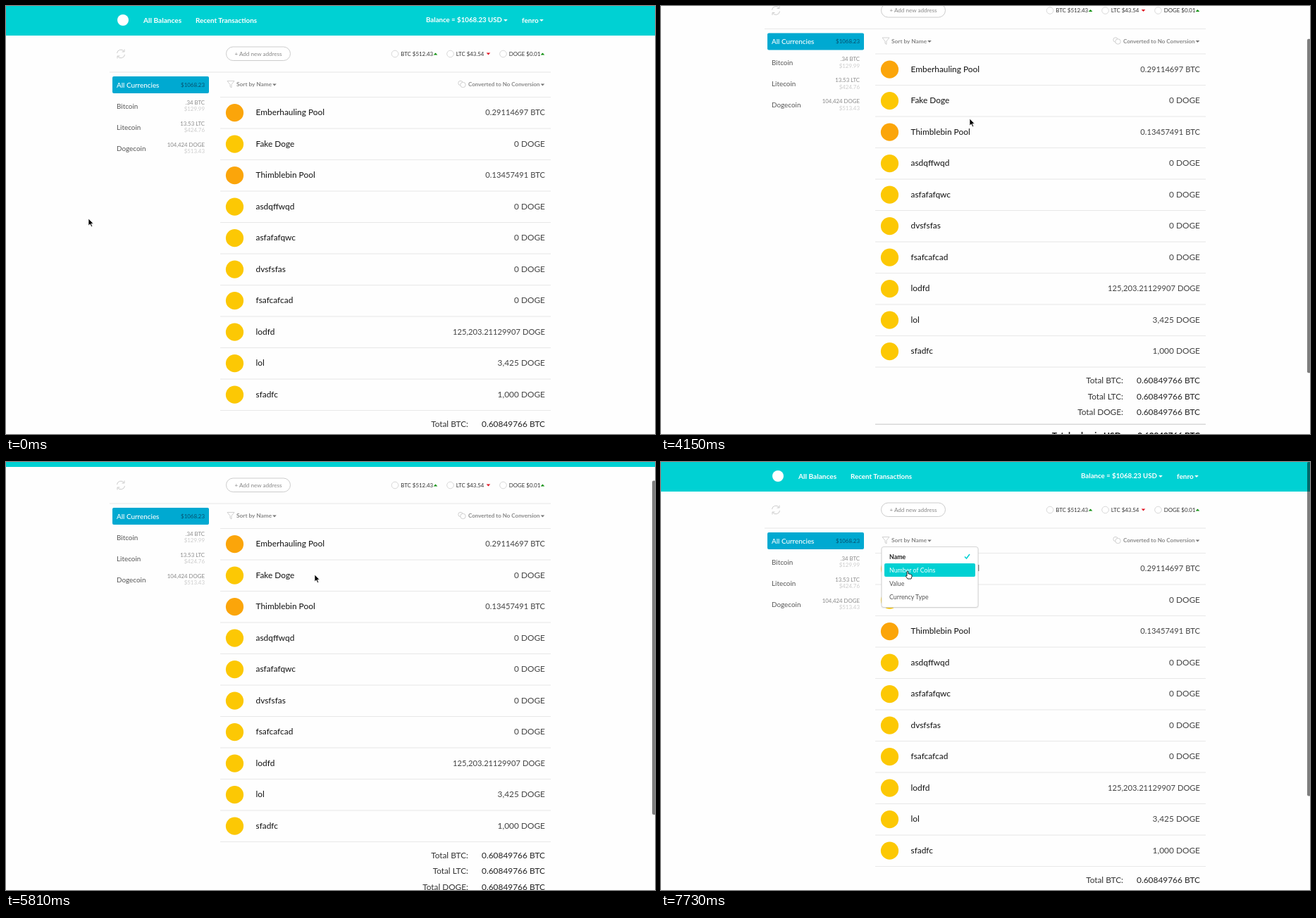
Recreate the animation shown at these times as an HTML page. Size 921 by 608 pixels, loop 8 s.

```html
<!DOCTYPE html>
<html lang="en">
<head>
<meta charset="utf-8">
<title>Balances</title>
<style>
html, body { margin: 0; width: 100%; height: 100%; overflow: hidden; background: #fefefe; }
svg { display: block; width: 921px; height: 608px; font-family: Lato, "Open Sans", sans-serif; }
</style>
</head>
<body>
<svg viewBox="0 0 921 608">
  <g id="page"></g>
  <rect id="thumb" x="917" width="5" height="475" rx="2" fill="#000" opacity=".5"/>
  <path id="arrow" d="M0 0V10L2.3 7.8L4 11.6L5.6 10.9L4 7.2H7Z" fill="#000" stroke="#fff" stroke-width=".7"/>
  <path id="hand" d="M-1 7V1Q0 -.6 1 1V4Q2 3.2 2.8 4.4Q4 3.8 4.5 5Q6 4.6 6 6V8L5 11H0L-2.6 7.4Q-2.6 5.8 -1 7Z" fill="#fff" stroke="#111" stroke-width=".9"/>
</svg>
<script>
const LOOP = 8000, TEAL = '#00d1d3';
const $ = id => document.getElementById(id);

// Text is placed by the middle of its capitals.
const text = (x, y, str, size, fill, weight = 400, anchor = 'start') =>
  `<text x="${x}" y="${y + size * .36}" font-size="${size}" fill="${fill}" font-weight="${weight}" text-anchor="${anchor}">${str}</text>`;
const right = (x, y, str, size, fill, weight) => text(x, y, str, size, fill, weight, 'end');
const rect = (x, y, w, h, fill, more = '') =>
  `<rect x="${x}" y="${y}" width="${w}" height="${h}" fill="${fill}" ${more}/>`;
const circle = (x, y, r, fill, stroke = 'none') =>
  `<circle cx="${x}" cy="${y}" r="${r}" fill="${fill}" stroke="${stroke}"/>`;
const caret = (x, y, fill, h = 3) =>
  `<path d="M${x - 2.8} ${y - h / 2}h5.6l-2.8 ${h}z" fill="${fill}"/>`;
const line = (d, stroke, width = 1) =>
  `<path d="${d}" fill="none" stroke="${stroke}" stroke-width="${width}"/>`;

function header() {
  return rect(0, -30, 921, 72, TEAL) + circle(166, 20, 8, '#fff') +
    text(195, 20, 'All Balances', 10.1, '#fff', 700) +
    text(269, 20, 'Recent Transactions', 9.8, '#fff', 700) +
    text(596, 20, 'Balance ≈ $1068.23 USD', 9.7, '#fff', 700) + caret(709, 20.5, '#fff') +
    text(732, 20, 'fenro', 10, '#fff', 700) + caret(760, 20.5, '#fff');
}

function toolbar() {
  const ticker = [[552, 'BTC $512.43', 609.5, 1], [630.5, 'LTC $43.54', 684.5, 0], [705.5, 'DOGE $0.01', 761.5, 1]];
  return line('M157.5 67a5.5 5.5 0 0 1 10-2.5m.5-3v3.5h-3.5M168.500 69a5.5 5.5 0 0 1-10 2.500m-.5 3v-3.500h3.500', '#ccc') +
    rect(312.5, 58, 91, 19.5, '#fff', 'rx="9.75" stroke="#ccc"') +
    text(358, 67.7, '+ Add new address', 8.1, '#888', 400, 'middle') +
    ticker.map(([x, s, cx, up]) => circle(x, 68, 4.8, '#fff', '#d8d8d8') +
      text(x + 8.2, 67.7, s, 7.9, '#333') +
      caret(cx, 68, up ? '#0a8f0a' : '#e01020', up ? -3 : 3)).join('') +
    rect(147, 93.5, 626, 1, '#e8e8e8') +
    line('M314 106.500h10l-4 5v4.500l-2-1.500v-3z', '#ccc', .9) +
    text(327, 111.5, 'Sort by Name', 8.3, '#888', 700) + caret(381, 112, '#777') +
    circle(645, 109.5, 3.2, '#fff', '#d0d0d0') + circle(648.5, 112, 3.7, '#fff', '#d0d0d0') +
    text(656, 111.5, 'Converted to No Conversion', 8, '#888', 700) + caret(761.5, 112, '#777');
}

function sidebar() {
  const coins = [['Bitcoin', '.34 BTC', '$129.99'], ['Litecoin', '13.53 LTC', '$424.76'], ['Dogecoin', '104,424 DOGE', '$513.43']];
  return rect(151, 100, 137, 24, '#00a9d1', 'rx="2"') +
    text(157, 112, 'All Currencies', 9.9, '#fff', 500) + right(282, 112, '$1068.23', 7.9, '#06506e') +
    coins.map(([name, amount, value], i) => text(157, 142 + i * 30, name, 9.9, '#555') +
      right(282, 137 + i * 30, amount, 7.8, '#888') + right(282, 146.5 + i * 30, value, 7.9, '#ccc')).join('');
}

function table() {
  const rows = [['Emberhauling Pool', '0.29114697 BTC'], ['Fake Doge', '0 DOGE'], ['Thimblebin Pool', '0.13457491 BTC'],
    ['asdqffwqd', '0 DOGE'], ['asfafafqwc', '0 DOGE'], ['dvsfsfas', '0 DOGE'], ['fsafcafcad', '0 DOGE'],
    ['lodfd', '125,203.21129907 DOGE'], ['lol', '3,425 DOGE'], ['sfadfc', '1,000 DOGE']];
  const totals = ['BTC', 'LTC', 'DOGE'], sum = '0.60849766 BTC';
  return rows.map(([name, value], i) => {
    const y = 151 + i * 44.5;
    return rect(304, y - 22, 469, 1, '#e8e8e8') +
      circle(324.5, y + .7, 12.6, value.endsWith('BTC') ? '#fba50a' : '#fcc804') +
      text(354.5, y, name, 11.9, '#111') + right(765, y, value, value.length > 12 ? 11.2 : 11.9, '#444');
  }).join('') + rect(304, 574, 469, 1, '#e8e8e8') +
    totals.map((c, i) => right(656, 593.5 + i * 22.5, `Total ${c}:`, 11.8, '#333') +
      right(765, 593.5 + i * 22.5, sum, 11.9, '#222')).join('') +
    rect(304, 655, 469, 1.5, '#d8d8d8') +
    right(656, 671.5, 'Total value in USD:', 12.1, '#111', 700) + right(765, 671.5, sum, 11.7, '#111', 700);
}

function menu(hover) {
  const items = ['Name', 'Number of Coins', 'Value', 'Currency Type'];
  return rect(312, 121, 139, 87, '#000', 'rx="4" opacity=".06"') +
    rect(313, 120.5, 137, 86, '#fff', 'rx="3" stroke="#d4d4d4"') +
    items.map((s, i) => {
      const y = 135 + i * 18.8, on = i === hover;
      return (on ? rect(317, y - 9.7, 129, 19, TEAL, 'rx="2"') : '') +
        text(324, y, s, 8.8, on ? '#fff' : i ? '#555' : '#222', i ? 400 : 700) +
        (i ? '' : line('M431 134.500l2.500 2.500l4.500-6', on ? '#fff' : TEAL, 1.5));
    }).join('');
}

$('page').innerHTML = header() + toolbar() + sidebar() + table() +
  [-1, 0, 1, 2, 3].map(i => `<g class="menu">${menu(i)}</g>`).join('');
const menus = document.querySelectorAll('.menu');

// Page offset from each time on.
const scrolls = [[4030, 7], [4090, 33], [4150, 61.5], [4330, 138], [4510, 164], [4690, 170], [5100, 167], [5280, 154],
  [5460, 111.5], [5630, 85], [5810, 35], [5960, 4], [6140, -2], [6320, -.7], [6500, 0]];

// Pointer moves: first step, last step, steps, x, y, ease-out power, bend
const moves = [[420, 420, 1, 117, 299], [590, 1360, 13, 213, 34], [1420, 2180, 13, 722, 19, 2.5, 79],
  [2300, 2590, 5, 862, 86], [3310, 3310, 1, 754, 19], [3430, 3850, 8, 438, 160, 1.5],
  [5960, 6320, 3, 426, 153], [6500, 6500, 1, 368, 118], [6670, 6670, 1, 350, 109], [7150, 7730, 11, 350, 155]];

function pointer(t) {
  let x = 117, y = 302;
  for (const [from, to, n, x1, y1, power = 1, bend = 0] of moves) {
    if (t < from) break;
    const step = (to - from) / (n - 1) || 1;
    const k = Math.min(n, Math.floor((t - from) / step + 1e-6) + 1);
    const e = 1 - (1 - k / n) ** power;
    x += (x1 - x) * e;
    y += (y1 - y) * e + bend * e * (1 - e);
  }
  return [x, y];
}

function draw(t) {
  const scroll = scrolls.reduce((s, [from, v]) => t >= from ? v : s, 0);
  const [x, y] = pointer(t), open = t >= 6850;
  const row = open && y >= 125.3 ? Math.floor((y - 125.3) / 18.8) : -1;
  const inside = (l, r, top, bottom) => x >= l && x <= r && y >= top && y <= bottom;
  const link = row >= 0 || t < 4000 && (inside(596, 712, 12, 29) || inside(730, 764, 12, 29)) ||
    t > 6500 && inside(313, 384, 104, 117);

  $('page').setAttribute('transform', `translate(0 ${-scroll})`);
  $('thumb').setAttribute('y', Math.max(0, scroll * .76));
  $('thumb').setAttribute('height', 474.5 + Math.min(0, scroll) * 2);
  $('thumb').style.display = t >= 4030 ? '' : 'none';
  menus.forEach((m, i) => m.style.display = open && i === row + 1 ? '' : 'none');
  for (const id of ['arrow', 'hand']) {
    $(id).setAttribute('transform', `translate(${x} ${y})`);
    $(id).style.display = (id === 'hand') === link ? '' : 'none';
  }
}

const start = performance.now();
function tick() {
  draw((performance.now() - start) % LOOP);
  requestAnimationFrame(tick);
}
tick();
</script>
</body>
</html>
```
